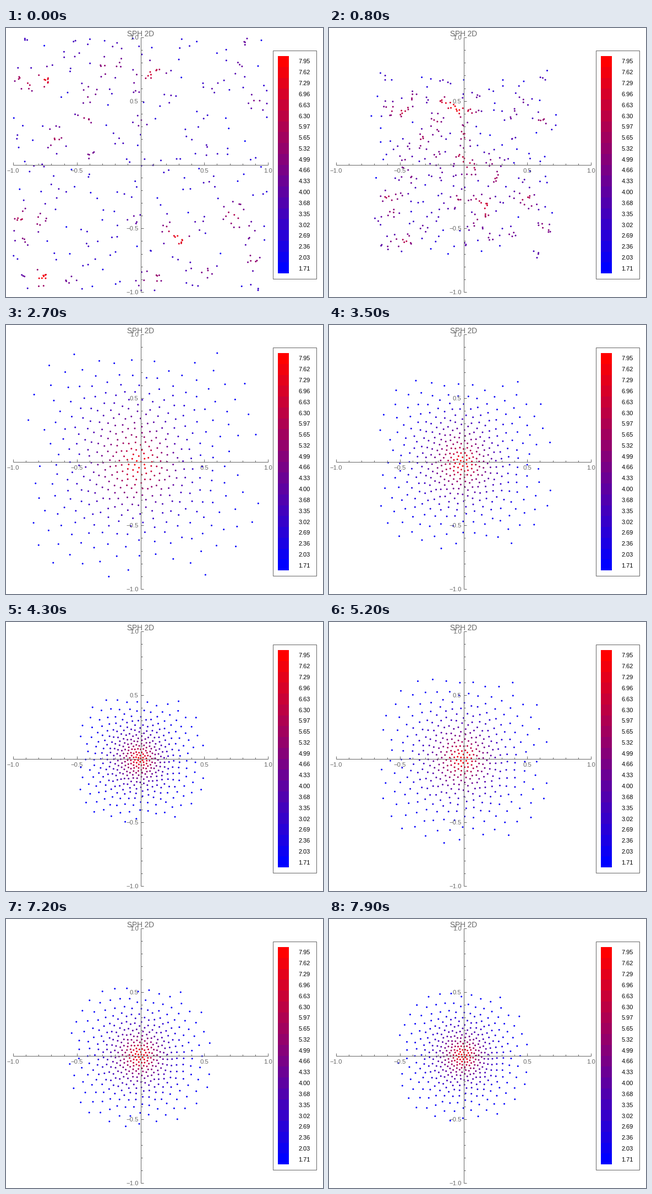
Animation of 576 by 489 pixels, one loop 8 s. Source, as a matplotlib script:

```python
import numpy as np
import matplotlib.pyplot as plt
from matplotlib.animation import FuncAnimation
from matplotlib.patches import Rectangle

W, H, DPI = 576, 489, 96
PX = 72 / DPI
FRAMES, STEP = 80, 100
CX, CY, UNIT = 244.5, 248.5, 231.5
COUNT = 400
GREY = "#666666"

# Tight groups in the starting square: centre x, centre y, particle count
CLUMPS = [(-0.76, -0.88, 6), (-0.39, 0.35, 4), (0.70, -0.41, 3),
          (0.33, -0.60, 4), (0.28, -0.56, 3), (-0.95, -0.42, 5),
          (-0.40, 0.09, 3), (0.81, 0.95, 3), (0.13, 0.74, 3),
          (0.08, 0.71, 3), (-0.98, 0.68, 3), (-0.57, -0.92, 4),
          (-0.93, -0.88, 3), (0.87, -0.76, 4), (0.12, -0.86, 3),
          (-0.73, 0.67, 4), (-0.65, 0.21, 4), (-0.43, -0.07, 2)]

# Outer radius of the cloud over time (seconds, axis units)
TIMES = [0, 0.45, 0.9, 1.3, 1.6, 2.1, 2.7, 3.1, 3.6, 4.0, 4.3, 4.9,
         5.2, 5.4, 6.0, 6.3, 6.5, 7.2, 7.5, 7.9]
RADII = [1.19, 1.08, 0.83, 0.57, 0.46, 0.66, 0.94, 0.87, 0.66, 0.50, 0.51,
         0.71, 0.68, 0.63, 0.42, 0.35, 0.37, 0.57, 0.58, 0.525]


def smooth(t, xs, ys):
    """Cubic Hermite curve through the points."""
    xs, ys = np.array(xs), np.array(ys)
    m = np.gradient(ys, xs)
    i = np.clip(np.searchsorted(xs, t, side="right") - 1, 0, len(xs) - 2)
    h = xs[i + 1] - xs[i]
    u = (t - xs[i]) / h
    return (ys[i] * (1 + 2 * u) * (1 - u) ** 2 + m[i] * h * u * (1 - u) ** 2
            + ys[i + 1] * u * u * (3 - 2 * u) + m[i + 1] * h * u * u * (u - 1))


def start(rng):
    pos = rng.uniform(-1, 1, (COUNT, 2))
    k = 0
    for x, y, n in CLUMPS:
        pos[k:k + n] = (x, y) + rng.normal(0, 0.018, (n, 2))
        k += n
    return np.clip(pos, -1, 1)


def pairs(p):
    diff = p[:, None] - p[None]
    return diff, np.hypot(diff[..., 0], diff[..., 1])


def relax(p, rate):
    """Push close neighbours apart, more loosely towards the rim."""
    diff, dist = pairs(p)
    r = np.hypot(*p.T)
    reach = 1.5 * (0.05 + 0.075 * np.minimum(r, 1.1))
    reach = (reach[:, None] + reach[None]) / 2
    push = np.clip(1 - dist / reach, 0, None) * reach
    np.fill_diagonal(push, 0)
    move = (diff / (dist + 1e-6)[..., None] * push[..., None]).sum(1)
    p = p + rate * 0.16 * move
    pull = 1 - rate * 0.06 * np.clip(r - 1, 0, None)
    return p * pull[:, None]


def colours(p):
    _, dist = pairs(p)
    rho = np.exp(-(dist / 0.07) ** 2).sum(1)
    c = (rho - rho.min()) / np.ptp(rho)
    return np.column_stack([c, 0 * c, 1 - c])


def simulate():
    rng = np.random.default_rng(12)
    p = start(rng)
    drift = rng.normal(0, 0.006, p.shape)
    out = []
    for k in range(FRAMES):
        r = np.hypot(*p.T)
        edge = np.percentile(r, 97)
        p = p / edge
        size = edge if k == 0 else smooth(k * STEP / 1000, TIMES, RADII)
        out.append((p * size, colours(p)))
        if k < 16:
            p = p * np.hypot(*p.T)[:, None] ** 0.03
        if k < 24:
            p = p + drift
        p = relax(p, np.clip((k - 8) / 14, 0, 1))
    return out


def label(x, y, s, px=11.2, color=GREY, ha="center"):
    ax.text(x, y, s, fontsize=px * PX, color=color, ha=ha,
            va="center_baseline", family="Liberation Sans", zorder=5)


def line(xs, ys):
    ax.plot(xs, ys, color=GREY, lw=PX, zorder=4, solid_capstyle="butt")


def draw_axes():
    line([CX - UNIT, CX + UNIT], [CY, CY])
    line([CX, CX], [CY - UNIT, CY + UNIT])
    for i in range(-10, 11):
        if i == 0:
            continue
        n = 5 if i % 5 == 0 else 3
        x, y = CX + UNIT * i / 10, CY - UNIT * i / 10
        line([x, x], [CY, CY - n])
        line([CX, CX + n], [y, y])
        if i % 5 == 0:
            s = f"{i / 10:.1f}".replace("-", "\u2212")
            label(x, 259, s)
            label(240.5, y, s, ha="right")
    label(244, 9.5, "SPH 2D", 13.6)


def draw_legend():
    ax.add_patch(Rectangle((484.5, 40.5), 79, 415, fill=False,
                           ec=GREY, lw=PX))
    n, top, band = 20, 51, 19.75
    for i in range(n):
        c = 1 - i / (n - 1)
        ax.add_patch(Rectangle((494, top + i * band), 20, band,
                               fc=(c, 0, 1 - c), lw=0))
        label(542, 60.5 + 19.8 * i, f"{7.9456 - 0.32845 * i:.2f}", 11, "black")


fig = plt.figure(figsize=(W / DPI, H / DPI), dpi=DPI, facecolor="white")
ax = fig.add_axes([0, 0, 1, 1])
ax.set_xlim(0, W)
ax.set_ylim(H, 0)
ax.axis("off")
draw_axes()
draw_legend()

states = simulate()
dots = ax.scatter(np.zeros(COUNT), np.zeros(COUNT), s=(3 * PX) ** 2,
                  linewidths=0, zorder=3)


def update(k):
    p, c = states[k]
    dots.set_offsets(np.column_stack([CX + UNIT * p[:, 0],
                                      CY - UNIT * p[:, 1]]))
    dots.set_facecolor(c)
    return dots,


anim = FuncAnimation(fig, update, frames=FRAMES, interval=STEP, repeat=True,
                     repeat_delay=0)
plt.show()
```
